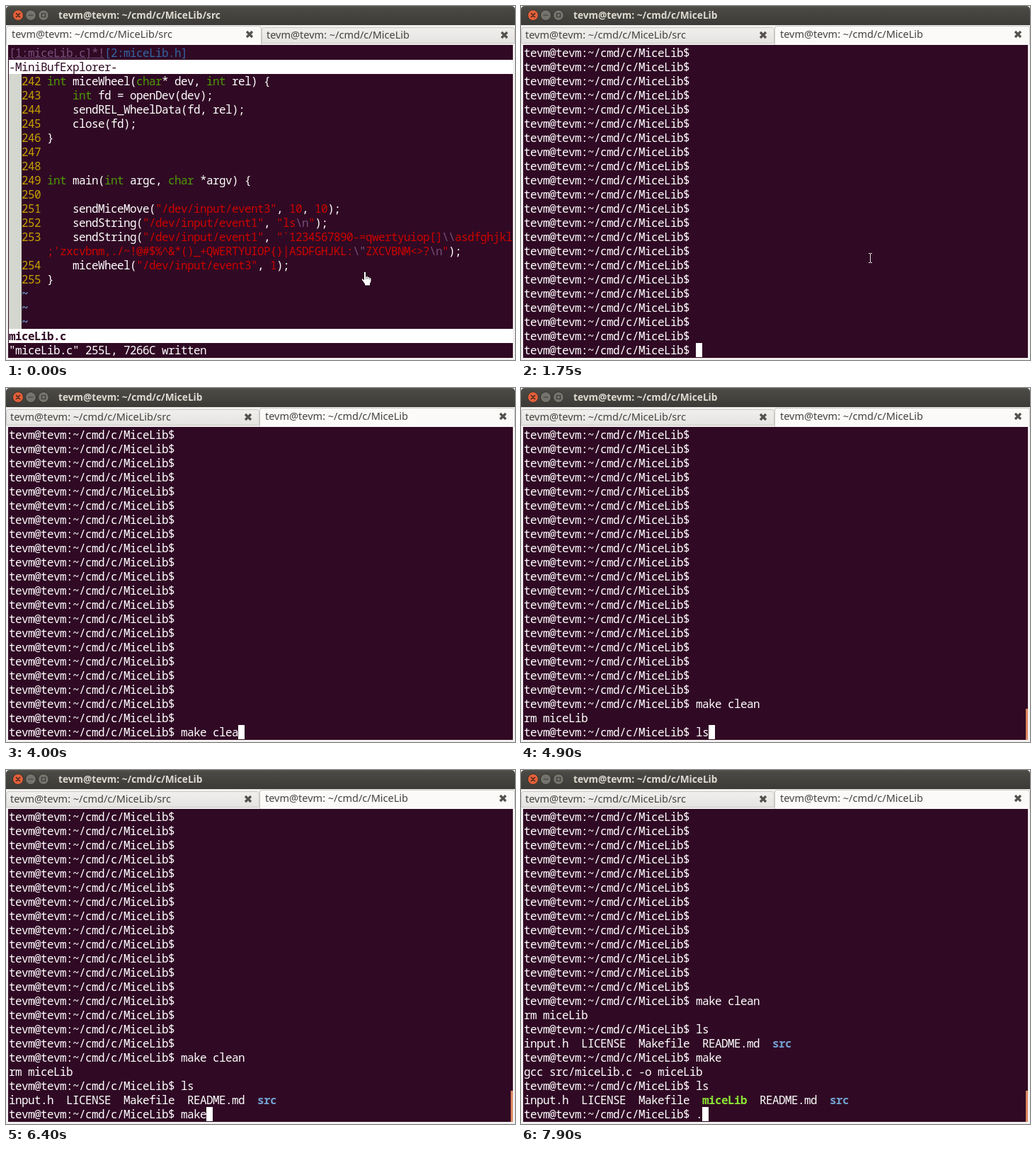
These frames come from a looping animation (719x500 px, 8000 ms). An HTML page:

```html
<!DOCTYPE html>
<html lang="en">
<head>
<meta charset="utf-8">
<title>Terminal</title>
<style>
html, body { margin: 0; width: 719px; height: 500px; overflow: hidden; background: #f2f1f0; }
#stage { position: relative; width: 719px; height: 500px; overflow: hidden; }
#stage div, #stage svg { position: absolute; }
#bar { left: 0; top: 0; width: 719px; height: 27px; background: linear-gradient(#55544f, #4a4944 12%, #3c3b37); border-radius: 5px 5px 0 0; }
#title { left: 74px; top: 3px; font: bold 13.7px/20px "Noto Sans", "Open Sans", sans-serif; color: #dfdbd2; white-space: pre; }
.tab { box-sizing: border-box; top: 30px; height: 23px; background: linear-gradient(#f0efed, #e6e4e2); border: 1px solid #cbc8c4; border-radius: 4px 4px 0 0; }
.tab.on { top: 28px; height: 27px; background: #fbfaf9; border-bottom: 0; }
.label { font: 14.5px/20px "Noto Sans", "Open Sans", sans-serif; color: #45433f; white-space: pre; }
#term { left: 3px; top: 55px; width: 713px; height: 442px; background: #300a24; overflow: hidden; }
.row { left: 1px; width: 712px; height: 20px; font: 500 16px/20px "Noto Sans Mono", "DejaVu Sans Mono", monospace; letter-spacing: -0.6px; color: #fff; white-space: pre; font-variant-ligatures: none; }
.row span { display: inline-block; height: 20px; vertical-align: top; }
.inv { background: #fff; color: #300a24; }
.bold, .dir, .exe, .tilde { font-weight: bold; }
.dir, .tilde { color: #729fcf; }
.exe { color: #8ae234; }
.type { color: #4e9a06; }
.str { color: #cc0000; }
.esc { color: #75507b; }
.num { color: #c4a000; }
.buf { color: #3465a4; }
.cur { color: #75507b; text-decoration: underline; }
.sign { background: #d3d7cf; }
.hollow { box-shadow: inset 0 0 0 1px #fff; }
#scroll { left: 710px; top: 398px; width: 3px; height: 44px; background: #dd8560; }
</style>
</head>
<body>
<div id="stage">
  <div id="bar"></div>
  <svg width="70" height="27" fill="none" stroke-linecap="round">
    <circle cx="17" cy="13" r="7.5" fill="#e2603a" stroke="#35342f"/>
    <path d="M14.5 10.5l5 5m0-5l-5 5" stroke="#49271b" stroke-width="1.6"/>
    <g fill="#75746c" stroke="#32312d">
      <circle cx="35" cy="13" r="7.5"/><circle cx="53" cy="13" r="7.5"/>
    </g>
    <path d="M32 13h6M50.5 10.5h5v5h-5z" stroke="#3a3934" stroke-width="1.2"/>
  </svg>
  <div id="title"></div>
  <div id="tabs"></div>
  <div id="term"><div id="rows"></div><div id="scroll"></div></div>
  <svg id="hand" style="left:500px;top:373px" width="18" height="24">
    <path d="M5.5 3.5Q5.5 2 7 2T8.500 3.500V9Q10.500 8 11 9.500Q13 9 13.500 10.500Q16 10 16 12.500V16L14.500 19V22H6.500V19.500L2.500 14Q1.500 12 3.500 12L5.500 13.500Z" fill="#fff" stroke="#1c0715"/>
    <path d="M8.500 9v4M11 10v3M13.500 11v2.500" stroke="#777"/>
  </svg>
  <svg id="beam" style="left:488px;top:347px" width="12" height="18" fill="none">
    <path d="M3 2.500H5L5.500 3L6 2.500H8M5.500 3V15M3 15.500H5L5.500 15L6 15.500H8" stroke="#e4dfe2"/>
  </svg>
</div>
<script>
const LOOP = 8000, ROWS = 22;
const $ = id => document.getElementById(id);
const raw = String.raw;
const safe = s => s.replace(/&/g, '&amp;').replace(/</g, '&lt;').replace(/>/g, '&gt;');
const span = (cls, s) => `<span class="${cls}">${safe(s)}</span>`;
const type = s => span('type', s);
// A string literal, with its escapes picked out
const str = s => s.split(/(\\.)/).filter(Boolean)
  .map(p => span(p[0] === '\\' ? 'esc' : 'str', p)).join('');

const user = 'tevm@tevm', dir = '~/cmd/c/MiceLib';
const heads = [`${user}: ${dir}/src`, `${user}: ${dir}`];
const prompt = `${user}:${dir}$ `;

const mouseDev = str('"/dev/input/event3"'), keyDev = str('"/dev/input/event1"');
const code = [
  `${type('int')} miceWheel(${type('char')}* dev, ${type('int')} rel) {`,
  `    ${type('int')} fd = openDev(dev);`,
  '    sendREL_WheelData(fd, rel);',
  '    close(fd);',
  '}',
  '',
  '',
  `${type('int')} main(${type('int')} argc, ${type('char')} *argv) {`,
  '',
  `    sendMiceMove(${mouseDev}, ${str('10')}, ${str('10')});`,
  `    sendString(${keyDev}, ${str(raw`"ls\n"`)});`,
  `    sendString(${keyDev}, ${str('"`1234567890-=qwertyuiop[]' + raw`\\asdfghjkl`)}`,
  null,
  `    @iceWheel(${mouseDev}, ${str('1')});`,
  '}'
];
const wrapped = str(raw`;'zxcvbnm,./~!@#$%^&*()_+QWERTYUIOP{}|ASDFGHJKL:\"ZXCVBNM<>?\n"`) + ');';

function editorRows(cursor) {
  const sign = span('sign', '  ');
  let n = 242;
  // null marks the continuation of a wrapped line, @ the cursor cell
  const body = code.map(line => line === null
    ? sign + '    ' + wrapped
    : sign + span('num', n++ + ' ') + line.replace('@', cursor ? span(cursor, 'm') : 'm'));
  return [
    span('cur', '[1:miceLib.c]*!') + span('buf', '[2:miceLib.h]'),
    span('inv', '-MiniBufExplorer-'.padEnd(80)),
    ...body,
    ...Array(3).fill(sign + span('tilde', '~')),
    span('inv bold', 'miceLib.c'.padEnd(80)),
    '"miceLib.c" 255L, 7266C written'
  ];
}

const src = span('dir', 'src');
const log = [
  prompt + 'make clean',
  'rm miceLib',
  prompt + 'ls',
  'input.h  LICENSE  Makefile  README.md  ' + src,
  prompt + 'make',
  'gcc src/miceLib.c -o miceLib',
  prompt + 'ls',
  `input.h  LICENSE  Makefile  ${span('exe', 'miceLib')}  README.md  ${src}`
];

function shellRows({ done, text, blank }) {
  const last = (text === null ? '' : prompt + text) + (blank ? '' : span('inv', ' '));
  return [...Array(ROWS).fill(prompt), ...log.slice(0, done), last].slice(-ROWS);
}

const steps = [
  { at: 0, edit: true, hand: true },
  { at: 1000, edit: true, cursor: 'inv', beam: true },
  { at: 1600, edit: true, cursor: 'hollow', beam: true },
  { at: 1750, done: 0, text: '', beam: true },
  { at: 2050, done: 0, text: '', beam: true, blank: true },
  { at: 2500, done: 0, text: '', beam: true }
];
// Adds one shell state every 150 ms
const type150 = (at, done, ...texts) =>
  texts.forEach((text, i) => steps.push({ at: at + i * 150, done, text }));
type150(2800, 0, 'ma', 'mak', 'make');
type150(3550, 0, 'make c', 'make cl', 'make cle', 'make clea', 'make clean');
type150(4300, 2, '');
type150(4750, 2, 'l', 'ls');
type150(5050, 4, '');
steps.push({ at: 5500, done: 4, text: '', blank: true });
type150(5950, 4, 'm', 'ma', 'mak', 'make');
type150(6850, 5, null);
type150(7000, 6, null);
type150(7150, 6, '', 'l', 'ls');
type150(7600, 8, '');
type150(7900, 8, '.');

function tab(i, active) {
  const on = i === active;
  const split = active ? 358 : 361;
  const left = i ? split : 0, width = i ? 719 - split : split;
  const shift = 360 * i - (active ? 2 : 0), drop = on ? 0 : 1;
  return `<div class="tab${on ? ' on' : ''}" style="left:${left}px;width:${width}px"></div>
    <div class="label" style="left:${8 + shift}px;top:${29 + drop}px">${heads[i]}</div>
    <svg style="left:${338 + shift}px;top:${34 + drop}px" width="12" height="12">
      <path d="M2 2l8 8m0-8l-8 8" stroke="#55524e" stroke-width="3.2"/></svg>`;
}

function draw(s) {
  const active = s.edit ? 0 : 1;
  const rows = s.edit ? editorRows(s.cursor) : shellRows(s);
  $('title').textContent = heads[active];
  $('tabs').innerHTML = tab(0, active) + tab(1, active);
  $('rows').innerHTML = rows.map((r, i) =>
    `<div class="row" style="top:${1 + 20 * i}px">${r}</div>`).join('');
  $('scroll').style.display = s.done ? '' : 'none';
  $('hand').style.display = s.hand ? '' : 'none';
  $('beam').style.display = s.beam ? '' : 'none';
}

const start = performance.now();
let shown;
function tick() {
  const t = (performance.now() - start) % LOOP;
  const now = steps.filter(s => s.at <= t).pop();
  if (now !== shown) draw(shown = now);
  requestAnimationFrame(tick);
}
tick();
</script>
</body>
</html>
```
